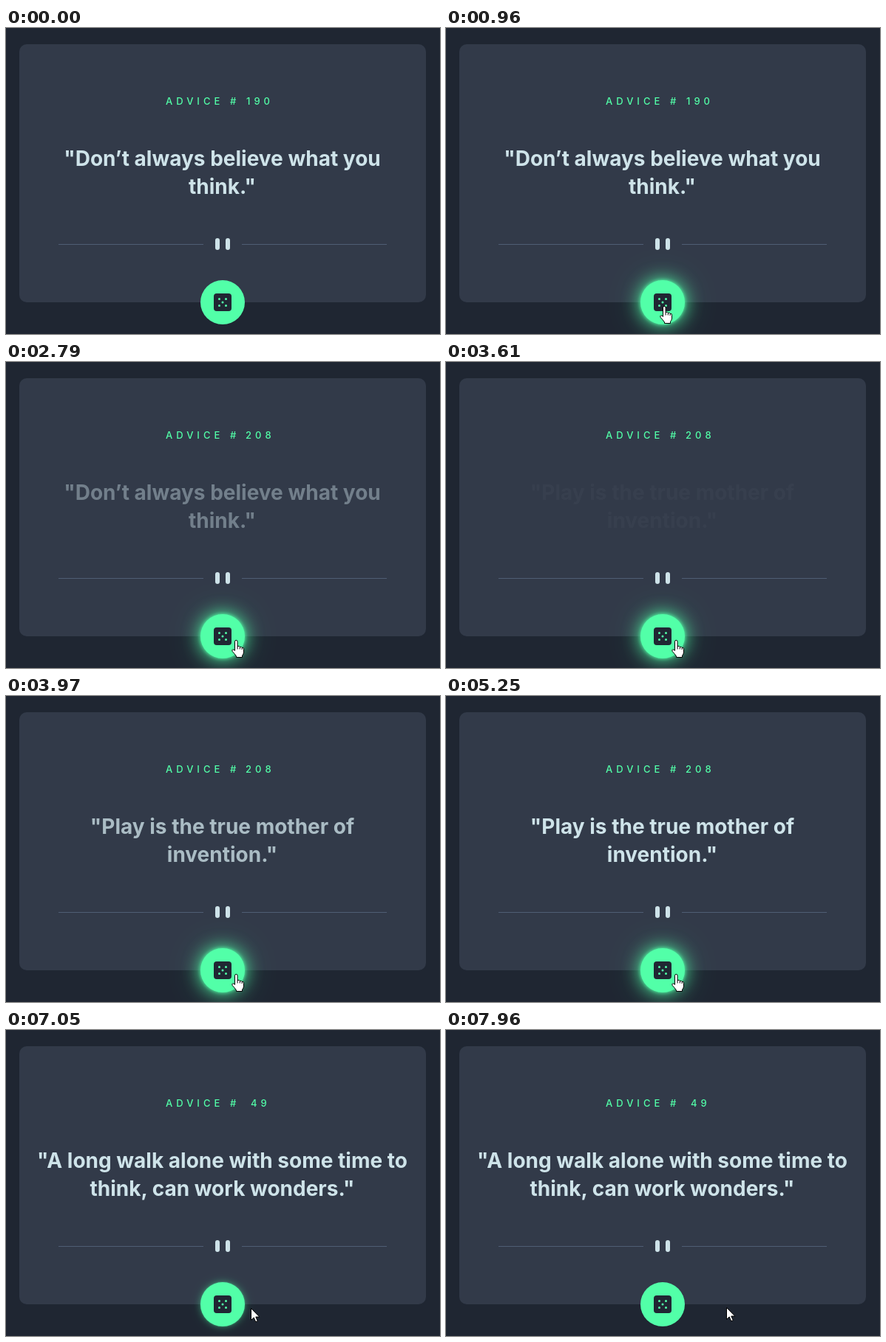
An HTML page that plays this animation: 587 px wide and 415 px high, repeating every 8000 ms.

```html
<!DOCTYPE html>
<html lang="en">
<head>
<meta charset="utf-8">
<title>Advice generator</title>
<style>
  html, body { margin: 0; width: 100%; height: 100%; overflow: hidden; background: #1f2632; }
  svg { display: block; width: 587px; height: 415px; }
  text { font-family: Inter, "Open Sans", sans-serif; font-optical-sizing: none; white-space: pre; }
  .label { font-size: 13px; font-weight: 500; letter-spacing: 5px; fill: #52ffa8; }
  .quote { font-size: 28px; font-weight: 700; text-anchor: middle; fill: #cee3e9; }
  .cursor { fill: #fff; stroke: #000; stroke-width: 1; stroke-linejoin: round; }
</style>
</head>
<body>
<svg viewBox="0 0 587 415">
  <rect width="587" height="415" fill="#1f2632"/>
  <rect x="18" y="22" width="550" height="350" rx="10" fill="#323a49"/>

  <text class="label" y="104"><tspan x="216">ADVICE</tspan><tspan x="303">#</tspan><tspan id="number"></tspan></text>
  <g id="quote" class="quote">
    <text x="292.5" y="187"></text>
    <text x="292.5" y="225"></text>
  </g>

  <path d="M71 293h196v1H71zM319 293h196v1H319z" fill="#4f5d74"/>
  <g fill="#cee3e9">
    <rect x="283" y="285" width="6" height="16" rx="3"/>
    <rect x="297" y="285" width="6" height="16" rx="3"/>
  </g>

  <g id="glow" fill="#52ffa8"></g>
  <circle id="button" cx="293" cy="372" r="30"/>
  <rect x="281" y="360" width="24" height="24" rx="4" fill="#202733"/>
  <g id="pips"></g>

  <g id="hand" class="cursor">
    <path d="M4.5 2.2a1.8 1.8 0 0 1 3.6 0V8.5q2.6-.8 3.2.9 2.3-.6 2.8.9 2.4-.4 2.4 1.9V17q-.4 2.5-2 4.2v2.3H6.5V22Q4.5 19 1.2 15.5.2 13.4 1.8 12.8q1.2-.2 2.7 1.7z"/>
    <path d="M8.1 8.5v4M11.3 9.5v3M14.1 10.5v2.5" fill="none"/>
  </g>
  <path id="arrow" class="cursor" d="M.5.5v16l3.7-3.5 2.5 5.8 2.6-1.1-2.5-5.6h5z"/>
</svg>
<script>
const LOOP = 8000, STEP = 90;
const $ = id => document.getElementById(id);

// Screen updates come in bursts: [start, count], STEP ms apart.
const bursts = [[500, 4], [960, 7], [1870, 3], [2520, 6], [3150, 1], [3610, 5], [4150, 1],
  [4510, 1], [5070, 9], [5970, 1], [6240, 9], [7050, 5], [7870, 2]];
const ticks = [0, ...bursts.flatMap(([start, n]) => Array.from({ length: n }, (_, i) => start + i * STEP))];

const quotes = [
  { at: 0, lines: ['"Don’t always believe what you', 'think."'] },
  { at: 3600, lines: ['"Play is the true mother of', 'invention."'] },
  { at: 6200, lines: ['"A long walk alone with some time to', 'think, can work wonders."'] }
];
const numbers = [
  { at: 0, text: '190', x: 325 },
  { at: 2520, text: '208', x: 324 },
  { at: 5340, text: '49', x: 331 }
];
const clicks = [1870, 5070];
const pressMix = [0.77, 0.35];

// Cursor hotspot: [time, x, y]
const track = [[500, 300, 396], [590, 294, 385], [680, 291, 378], [770, 291, 377], [870, 291, 377],
  [1500, 310, 377], [6690, 310, 377], [6870, 313, 377], [6960, 318, 377], [7050, 331, 377],
  [7140, 351, 377], [7230, 368, 376], [7320, 379, 376], [7410, 384, 376], [7780, 384, 376], [7960, 379, 376]];

// Blurred discs: [blur, opacity]
const halos = [[25, 0.25], [12.5, 1], [2.5, 1]];

const svgNode = (parent, name, attrs) => {
  const el = document.createElementNS('http://www.w3.org/2000/svg', name);
  for (const key in attrs) el.setAttribute(key, attrs[key]);
  return parent.appendChild(el);
};
const haloNodes = halos.map(() => svgNode($('glow'), 'circle', { cx: 293, cy: 372, r: 30 }));
for (const [x, y] of [[-4.5, -6], [4.5, -6], [0, 0], [-4.5, 6], [4.5, 6]])
  svgNode($('pips'), 'circle', { cx: 293 + x, cy: 372 + y * 0.75, r: 1.5 });

// CSS "ease" timing: cubic-bezier(.25, .1, .25, 1)
function ease(p) {
  if (p <= 0) return 0;
  if (p >= 1) return 1;
  const bezier = (a, b, s) => 3 * a * s * (1 - s) ** 2 + 3 * b * s * s * (1 - s) + s ** 3;
  let lo = 0, hi = 1;
  for (let i = 0; i < 24; i++) {
    const mid = (lo + hi) / 2;
    if (bezier(0.25, 0.25, mid) < p) lo = mid; else hi = mid;
  }
  return bezier(0.1, 1, lo);
}
const rise = (t, start, length) => ease((t - start) / length);
const latest = (list, t) => list.filter(item => item.at <= t).pop();

function quoteOpacity(t) {
  const fade = (out, back) => t < back ? 1 - rise(t, out, 850) : rise(t, back, 850);
  return t < 5070 ? fade(2500, 3570) : fade(5310, 6200);
}

function buttonColor(t) {
  const since = clicks.map(c => t - c).find(d => d >= 0 && d < 2 * STEP);
  const mix = since === undefined ? 0 : pressMix[Math.floor(since / STEP)];
  const from = [82, 255, 168], to = [206, 227, 233];
  return `rgb(${from.map((c, i) => Math.round(c + (to[i] - c) * mix))})`;
}

function cursorAt(t) {
  const next = track.findIndex(key => key[0] > t);
  if (next < 1) return track[next < 0 ? track.length - 1 : 0].slice(1);
  const a = track[next - 1], b = track[next], p = (t - a[0]) / (b[0] - a[0]);
  return [1, 2].map(i => Math.round(a[i] + (b[i] - a[i]) * p));
}

function draw(time) {
  const t = ticks.filter(tick => tick <= time).pop();

  const number = latest(numbers, t);
  $('number').textContent = number.text;
  $('number').setAttribute('x', number.x);

  const quote = latest(quotes, t);
  [...$('quote').children].forEach((line, i) => { line.textContent = quote.lines[i]; });
  $('quote').setAttribute('opacity', quoteOpacity(t));

  const glow = rise(t, 450, 300) - rise(t, 6945, 300);
  haloNodes.forEach((node, i) => {
    node.style.filter = `blur(${halos[i][0] * glow}px)`;
    node.style.opacity = halos[i][1] * glow;
  });

  const color = buttonColor(t);
  $('button').setAttribute('fill', color);
  $('pips').setAttribute('fill', color);

  const [x, y] = cursorAt(t);
  const pointing = t >= 500 && t < 7050;
  $('hand').setAttribute('transform', `translate(${x - 5} ${y})`);
  $('hand').style.display = pointing ? '' : 'none';
  $('arrow').setAttribute('transform', `translate(${x} ${y})`);
  $('arrow').style.display = t >= 7050 ? '' : 'none';
}

const begin = performance.now();
function frame() {
  draw((performance.now() - begin) % LOOP);
  requestAnimationFrame(frame);
}
frame();
</script>
</body>
</html>
```
